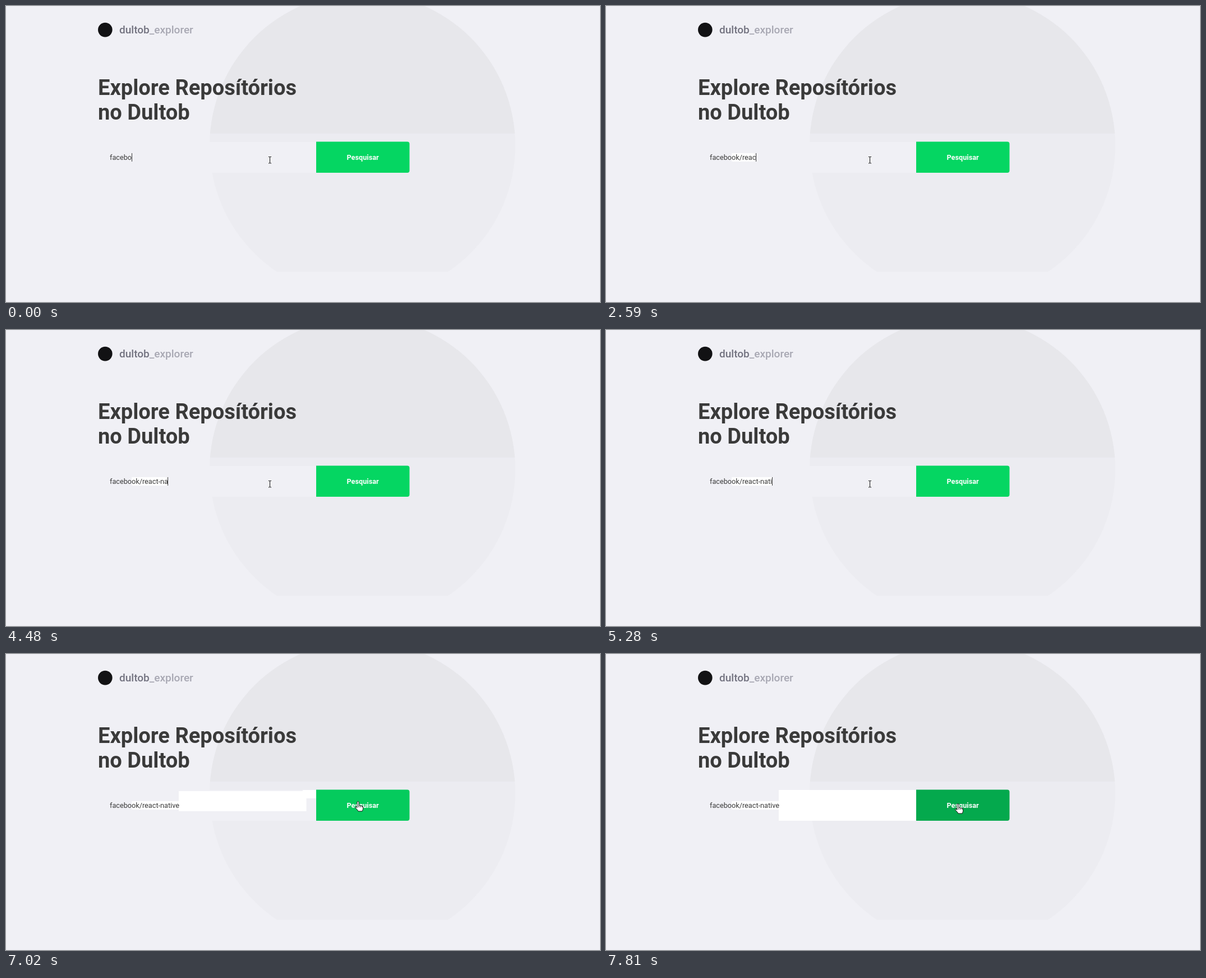
An HTML page with a canvas that plays this animation: 1059 by 529 pixels, repeating every 8000 ms.

```html
<!DOCTYPE html>
<html lang="pt-BR">
<head>
<meta charset="utf-8">
<title>Explorer</title>
<style>
html, body { margin: 0; width: 100%; height: 100%; overflow: hidden; background: #f0f0f5; }
canvas { display: block; }
</style>
</head>
<body>
<canvas id="stage" width="1059" height="529"></canvas>
<script>
const ctx = document.getElementById('stage').getContext('2d');
const LOOP = 8000, BLINK = 530, MOVE_START = 6630, MOVE_STEP = 130, PRESS = 7170;
const PAGE = '#f0f0f5', INK = '#3a3a3a';
const QUERY = 'facebook/react-native', FIRST_TYPED = 6;
const input = { left: 164, textX: 185, top: 243, height: 55, right: 553 };

const keyTimes = [150, 530, 1560, 2070, 2070, 2330, 2590, 2870,
  3840, 4230, 4480, 5160, 5280, 5970, 6120];
const pointerPath = [[468, 269], [530, 245], [582, 228], [636, 251], [621, 262.5]];

const shapes = {
  beam: new Path2D('M0 .5H2L2.5 1L3 .5H5M2.5 1V11.5M0 12H2L2.5 11.5L3 12H5'),
  arrow: new Path2D('M0 0V15L3.5 11.8L6 17.5L8.5 16.5L6 11H10.8Z'),
  hand: new Path2D('M5 12V2.5a1.5 1.5 0 0 1 3 0V8q2.5-1 3 .7q2.5-.8 3 .8' +
    'q1.5-.3 1.5 1.5V14q0 2-1.5 4.5H7Q5 15 2 12.5Q1 10.5 3 10.5Z'),
  fingers: new Path2D('M8 8V11.5M11 8.8V11.5M14 9.6V11.5')
};

function rect(color, x, y, w, h, radii = 0) {
  ctx.fillStyle = color;
  ctx.beginPath();
  ctx.roundRect(x, y, w, h, radii);
  ctx.fill();
}

function disc(color, x, y, r) {
  ctx.fillStyle = color;
  ctx.beginPath();
  ctx.arc(x, y, r, 0, 2 * Math.PI);
  ctx.fill();
}

// Draws text and returns the x position of its end.
function text(str, x, y, weight, size, color) {
  ctx.font = `${weight} ${size}px Roboto, sans-serif`;
  ctx.fillStyle = color;
  ctx.fillText(str, x, y);
  return x + ctx.measureText(str).width;
}

function pointerAt(t) {
  const last = pointerPath.length - 1;
  const step = Math.floor((t - MOVE_START) / MOVE_STEP) + 1;
  const [x, y] = pointerPath[Math.max(0, Math.min(last, step))];
  const shape = y < input.top ? 'arrow' : x < input.right ? 'beam' : 'hand';
  return { step, shape, x, y: t < PRESS ? y : y + 4 };
}

function drawPage() {
  rect(PAGE, 0, 0, 1059, 529);
  disc('#e7e7eb', 635.5, 249, 272.5);
  rect('rgba(240,240,245,.6)', 0, 228, 1059, 301);
  rect(PAGE, 0, 475, 1059, 54);
  rect(PAGE, input.left, input.top, input.right - input.left, input.height);

  disc('#121214', 176.8, 42.6, 12.8);
  const end = text('dultob', 202, 49, 500, 19, '#737380');
  text('_explorer', end, 49, 500, 19, '#a8a8b3');
  text('Explore Reposítórios', 164, 159, 700, 38.06, INK);
  text('no Dultob', 164, 203, 700, 38.06, INK);
}

function drawInput(t, step) {
  const pressed = t >= PRESS;
  const keys = keyTimes.filter(time => time <= t);
  const typed = QUERY.slice(0, FIRST_TYPED + keys.length);
  const lastInput = pressed ? PRESS : keys.at(-1) ?? 0;

  ctx.font = '400 12.7px Roboto, sans-serif';
  const endOf = str => Math.floor(input.textX + ctx.measureText(str).width);
  const caretX = endOf(typed), whiteX = endOf(QUERY.slice(0, FIRST_TYPED));

  // White shows wherever the field has been repainted.
  if (keys.length) rect('#fff', whiteX, 263, caretX + 1 - whiteX, 15);
  if (step >= 1) rect('#fff', caretX, 245, 535.5 - caretX, 36);
  if (step >= 2) rect('#fff', 529, input.top, input.right - 529, 15);
  if (pressed) rect('#fff', caretX, input.top, input.right - caretX, input.height);

  text(typed, input.textX, 275, 400, 12.7, INK);
  if (t - lastInput < BLINK) rect(INK, caretX, 263, 1, 15);
}

function drawButton(t, hovered) {
  const color = t >= PRESS ? '#04a94d' : hovered ? '#05cb5d' : '#05d662';
  rect(color, input.right, 242.6, 166.4, 55.5, [0, 4, 4, 0]);
  text('Pesquisar', 607.5, 275, 700, 12.7, '#fff');
}

function drawPointer({ shape, x, y }) {
  ctx.save();
  ctx.translate(x, y);
  ctx.strokeStyle = '#111';
  ctx.fillStyle = '#fff';
  if (shape !== 'beam') ctx.fill(shapes[shape]);
  ctx.stroke(shapes[shape]);
  if (shape === 'hand') ctx.stroke(shapes.fingers);
  ctx.restore();
}

function frame() {
  const t = performance.now() % LOOP;
  const pointer = pointerAt(t);
  drawPage();
  drawInput(t, pointer.step);
  drawButton(t, pointer.shape === 'hand');
  drawPointer(pointer);
  requestAnimationFrame(frame);
}
frame();
</script>
</body>
</html>
```
